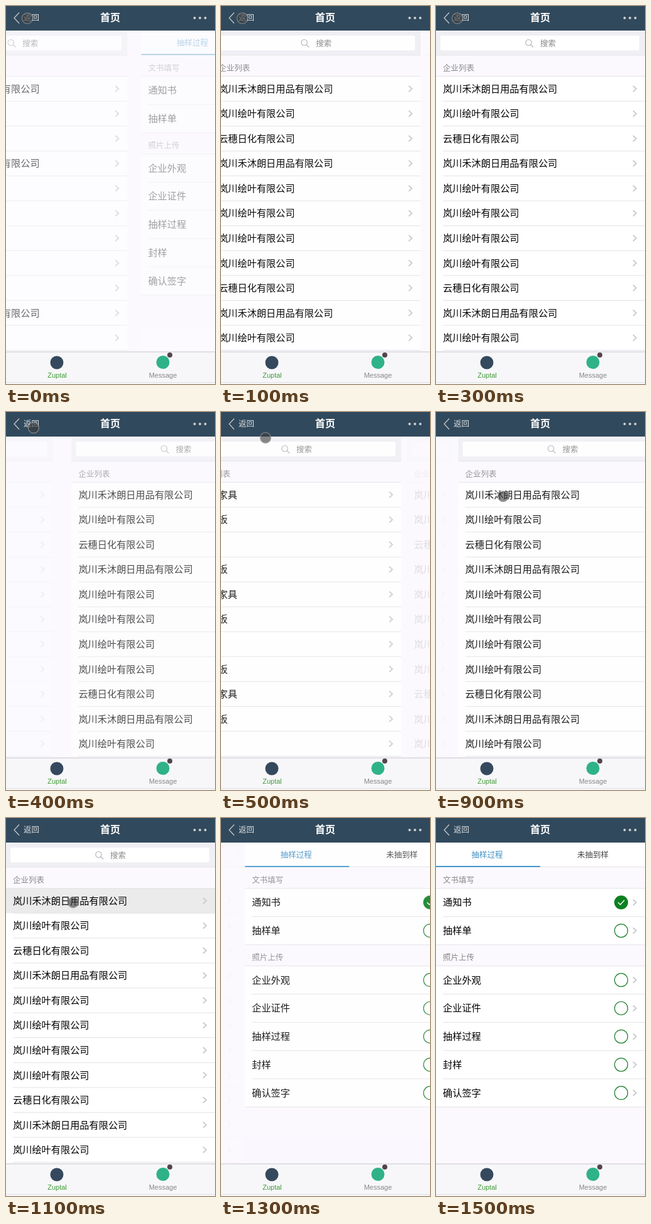
An HTML page for the animation above (1.6 s loop, 333 by 600 pixels).

```html
<!DOCTYPE html>
<html lang="zh-CN">
<head>
<meta charset="utf-8">
<title>首页</title>
<style>
  html, body { margin: 0; width: 100%; height: 100%; overflow: hidden; background: #fbf9fe; }
  svg { display: block; width: 333px; height: 600px; font-family: "Noto Sans CJK SC", "Noto Sans CJK", sans-serif; }
  text { dominant-baseline: alphabetic; }
  .row { font-size: 15.2px; fill: #000; }
  .small { font-size: 12.5px; fill: #888; }
  .tab { font: 11px "Liberation Sans", Arial, sans-serif; fill: #888; text-anchor: middle; }
  .mid { text-anchor: middle; }
  .rule { stroke: #e3e3e6; }
  .chev { fill: none; stroke: #c8c8cd; stroke-width: 1.8; }
  .ring { fill: #fff; stroke: #1b7f2b; stroke-width: 1.2; }
</style>
</head>
<body>
<svg viewBox="0 0 333 600">
  <defs><clipPath id="view"><rect y="39" width="333" height="510"/></clipPath></defs>
  <rect width="333" height="600" fill="#fbf9fe"/>
  <g clip-path="url(#view)">
    <g id="products"></g>
    <g id="companies"></g>
    <g id="detail"></g>
  </g>

  <rect width="333" height="39" fill="#31495c"/>
  <path d="M21 10.500l-8 8.500 8 8.500" fill="none" stroke="#ccc" stroke-width="1.200"/>
  <text class="small" x="28" y="23.300" style="fill:#dcdfe2">返回</text>
  <text class="mid" x="166" y="23.800" font-size="16" font-weight="700" fill="#fff">首页</text>
  <g fill="#ccd0d4"><circle cx="300.500" cy="19" r="2"/><circle cx="309" cy="19" r="2"/><circle cx="317.500" cy="19" r="2"/></g>

  <rect y="549" width="333" height="51" fill="#f7f7fa"/>
  <path d="M0 549H333" stroke="#c6c5ca"/>
  <path d="M0 597.500H333" stroke="#e0e0e4"/>
  <circle cx="81" cy="566" r="10.500" fill="#35495e"/>
  <circle cx="250" cy="565.500" r="10.500" fill="#2fb288"/>
  <circle cx="261" cy="554" r="4" fill="#54444b"/>
  <text class="tab" x="81.500" y="590" style="fill:#3f9b35">Zuptal</text>
  <text class="tab" x="250" y="590">Message</text>

  <g id="cursor">
    <circle id="dot" r="8.500" fill="#3c3c3c" fill-opacity=".6" stroke="#a0a0a0" stroke-opacity=".6" stroke-width="1.500"/>
    <g id="press">
      <circle r="18" fill="none" stroke="#000" stroke-width="3"/>
      <path d="M0 0v11l2.600-2.400 1.900 4.200 2-.9-1.900-4.100h3.600z" fill="#000" stroke="#fff" stroke-width=".6"/>
    </g>
  </g>
</svg>
<script>
const W = 333, LOOP = 1600, STEP = 100, MOVE = 250, LAG = 10;
const $ = id => document.getElementById(id);

const text = (cls, x, y, s, size = 15.2) => `<text class="${cls}" x="${x}" y="${y + size * 0.36}">${s}</text>`;
const rule = (y, x = 0) => `<path class="rule" d="M${x} ${y}H${W}"/>`;
const chevron = y => `<path class="chev" d="M314 ${y - 4.7}l5 4.700-5 4.700"/>`;

// White block of rows; extra(y, i) adds content to the right side
function rows(top, step, names, extra = () => '') {
  let out = `<rect y="${top}" width="${W}" height="${step * names.length}" fill="#fff"/>` + rule(top);
  names.forEach((name, i) => {
    const y = top + step * (i + 0.5);
    if (i) out += rule(top + step * i, 11);
    out += text('row', 11, y, name) + extra(y, i) + chevron(y);
  });
  return out;
}

function listPage(title, names) {
  return `<rect y="39" width="${W}" height="510" fill="#fbf9fe"/>
    <rect y="39" width="${W}" height="39" fill="#efeff4"/>${rule(78)}
    <rect x="7" y="47" width="317" height="23.500" rx="2.500" fill="#fff"/>
    <g fill="none" stroke="#b2b2b6" stroke-width="1.100"><circle cx="147.500" cy="58" r="4.700"/><path d="M151 61.500l4 4"/></g>`
    + text('small', 166, 59, '搜索', 12.5) + text('small', 11, 98, title, 12.5)
    + `<g>${rows(111.6, 39.53, names)}</g>` + rule(546.4, 11);
}

const goods = ['实木家具', '人造板', '化肥', '夹心板'];
const firms = ['岚川禾沐朗日用品有限公司', '岚川绘叶有限公司', '云穗日化有限公司'];
$('products').innerHTML = listPage('产品列表', Array.from({ length: 11 }, (_, i) => goods[i % 4]));
$('companies').innerHTML = listPage('企业列表', [...'01201111201'].map(i => firms[i]));

const ring = y => `<circle class="ring" cx="295" cy="${y}" r="10.500"/>`;
const check = y => `<circle cx="295" cy="${y}" r="11" fill="#0b8020"/>
  <path d="M290 ${y}l3.600 3.600 6.600-7" fill="none" stroke="#fff" stroke-width="1.400"/>`;
$('detail').innerHTML = `<rect y="39" width="${W}" height="510" fill="#fbf9fe"/>
  <rect y="39" width="${W}" height="39" fill="#fff"/>${rule(77.5)}
  <rect y="76" width="166" height="2" fill="#4097cb"/>
  <text class="small mid" x="81.500" y="62.800" style="fill:#3f8fc4">抽样过程</text>
  <text class="small mid" x="250" y="62.800" style="fill:#444">未抽到样</text>`
  + text('small', 11, 98, '文书填写', 12.5)
  + rows(111.6, 44.8, ['通知书', '抽样单'], (y, i) => i ? ring(y) : check(y)) + rule(201.2)
  + text('small', 11, 221, '照片上传', 12.5)
  + rows(234.8, 44.8, ['企业外观', '企业证件', '抽样过程', '封样', '确认签字'], ring) + rule(458.8);

// Pressed state of the first company row
const rowBack = $('companies').querySelector('g:last-of-type');
rowBack.querySelector('rect').insertAdjacentHTML('afterend',
  `<rect id="active" y="112" width="${W}" height="39" fill="#ebebeb"/>`);

// CSS "ease": cubic-bezier(.25, .1, .25, 1)
function ease(x) {
  if (x <= 0) return 0;
  if (x >= 1) return 1;
  const curve = (a, b, u) => 3 * a * u * (1 - u) ** 2 + 3 * b * u * u * (1 - u) + u ** 3;
  let lo = 0, hi = 1;
  for (let i = 0; i < 24; i++) {
    const mid = (lo + hi) / 2;
    if (curve(0.25, 0.25, mid) < x) lo = mid; else hi = mid;
  }
  return curve(0.1, 1, lo);
}

const pages = ['products', 'companies', 'detail'].map($);
// start time, page left, page entered
const moves = [[-94, 2, 1], [348, 1, 0], [737, 0, 1], [1140, 1, 2]];
const path = [[0, 34, 19.5], [400, 44, 25], [500, 71, 41], [600, 99, 108], [700, 107, 134]];

function place(page, x, opacity) {
  page.setAttribute('transform', `translate(${x.toFixed(2)} 0)`);
  page.setAttribute('opacity', opacity.toFixed(3));
}
const show = (id, on) => $(id).setAttribute('visibility', on ? 'visible' : 'hidden');
const last = (list, t) => list.filter(e => e[0] <= t).pop();

function draw(t) {
  const [start, from, to] = last(moves, t);
  const side = Math.sign(to - from);
  const out = ease((t - start) / MOVE);
  const into = ease((t - start - LAG) / MOVE);
  pages.forEach((page, i) => {
    if (i === from) place(page, -side * W * out, 1 - out);
    else if (i === to) place(page, side * W * (1 - into), into);
    else place(page, W, 0);
  });

  const [, x, y] = last(path, t);
  $('cursor').setAttribute('transform', `translate(${x} ${y})`);
  show('press', t === 700);
  show('dot', t !== 700 && t < 1300);
  show('active', t === 1100);
}

let origin;
function tick(now) {
  origin ??= now;
  const t = (now - origin) % LOOP;
  draw(Math.floor(t / STEP) * STEP);
  requestAnimationFrame(tick);
}
draw(0);
requestAnimationFrame(tick);
</script>
</body>
</html>
```
